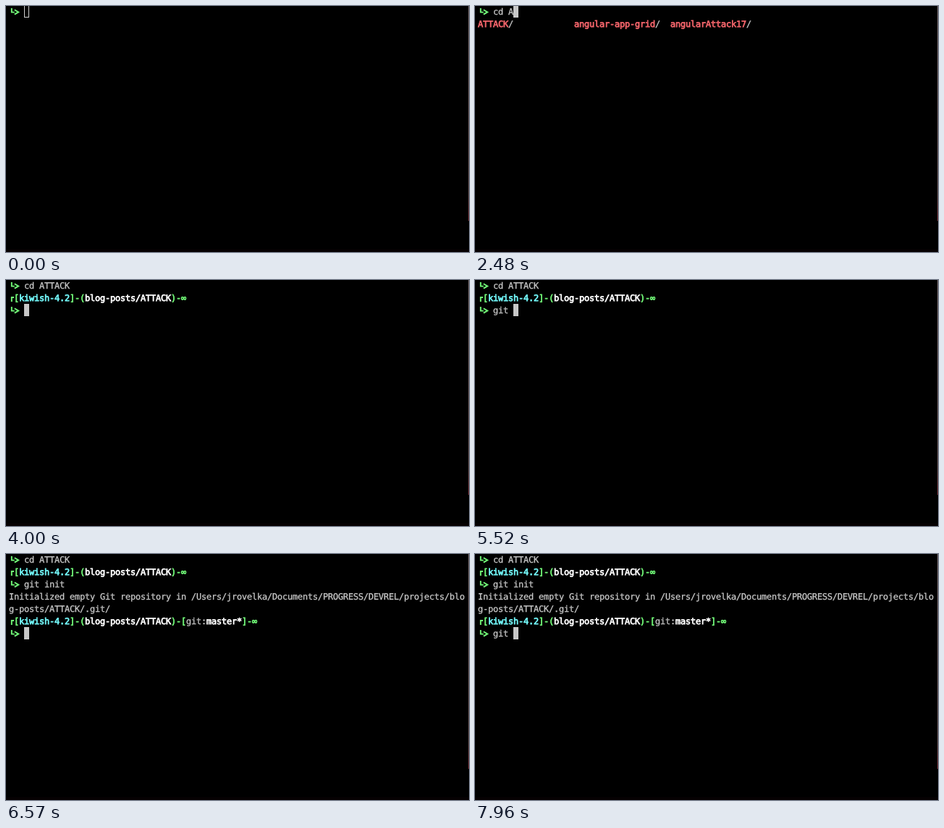
These frames come from a looping animation (640 px wide and 340 px high, 8 s). An HTML page:

```html
<!DOCTYPE html>
<html lang="en">
<head>
<meta charset="utf-8">
<title>Terminal session</title>
<style>
  html, body { margin: 0; width: 100%; height: 100%; overflow: hidden; background: #000; }
  svg { display: block; width: 640px; height: 340px; }
  text {
    font: 12px "DejaVu Sans Mono", "Liberation Mono", monospace;
    letter-spacing: -.224px;
    white-space: pre;
    text-rendering: geometricPrecision;
    fill: currentColor;
    stroke: currentColor;
    stroke-width: .75;
  }
  .plain { color: #c7c7c7; stroke-width: .3; }
  .green { color: #72fa78; }
  .cyan { color: #74fbfd; }
  .white { color: #fff; }
  .red { color: #f2646a; }
  .dark { color: #111; stroke-width: .2; }
  .arm { fill: none; stroke: #72fa78; stroke-width: 1.9; }
</style>
</head>
<body>
<svg id="stage" viewBox="0 0 640 340">
  <defs>
    <linearGradient id="edge" x1="0" y1="0" x2="0" y2="1">
      <stop offset="0" stop-color="#6c6062"/>
      <stop offset=".88" stop-color="#5c4a4c"/>
      <stop offset="1" stop-color="#742c36"/>
    </linearGradient>
  </defs>
  <rect width="640" height="340"/>
  <rect y="336" width="640" height="4" fill="#060102"/>
  <rect x="639" width="1" height="297" fill="url(#edge)"/>
</svg>
<script>
const LOOP = 8000, CELL = 7, ROW = 17, LEFT = 4;
const stage = document.getElementById('stage');
const timed = [];
const colX = col => LEFT + col * CELL;
const rowY = row => row * ROW - 1;

function add(tag, attrs, from = 0, to = LOOP) {
  const el = document.createElementNS('http://www.w3.org/2000/svg', tag);
  for (const name in attrs) el.setAttribute(name, attrs[name]);
  stage.append(el);
  timed.push({ el, from, to });
  return el;
}

// Writes [style, text] runs one after another on a row.
function write(row, col, runs, from, to) {
  for (const [style, text] of runs) {
    add('text', { class: style, x: colX(col), y: row * ROW + 12 }, from, to).textContent = text;
    col += text.length;
  }
}

function arrow(row, from) {
  const y = row * ROW;
  add('path', { class: 'arm', d: `M7.8 ${y + 3}v5.6h4M11.8 ${y + 5.2}l5.4 3.2l-5.4 3.2` }, from);
}

function prompt(row, from, branch) {
  add('path', { class: 'arm', d: `M11 ${row * ROW + 7}h-3.2v6` }, from);
  const git = branch ? [['green', '['], ['plain', 'git:'], ['white', branch], ['green', ']-']] : [];
  write(row, 1, [
    ['green', '['], ['cyan', 'kiwish-4.2'], ['green', ']-('],
    ['white', 'blog-posts/ATTACK'], ['green', ')-'], ...git, ['green', '∞']
  ], from);
  arrow(row + 1, from);
}

// Cursor stops: [time, row, column]
const stops = [[0, 0, 3]];

function type(row, text, times, to) {
  times.forEach((time, i) => {
    write(row, 3 + i, [['plain', text[i]]], time, to);
    stops.push([time, row, 4 + i]);
  });
}

const LIST = 2480, PICK = 2760, ACCEPT = 3130, RUN = 3520, READY = 3680;
const INIT = 6350, DONE = 6480;

arrow(0, 0);
type(0, 'cd A', [1130, 1300, 1570, 1870]);

add('rect', { x: LEFT, y: rowY(1), width: 17 * CELL, height: ROW, fill: '#c7c7c7' }, PICK, ACCEPT);
write(1, 0, [['red', 'ATTACK'], ['plain', '/']], LIST, PICK);
write(1, 0, [['dark', 'ATTACK/']], PICK, ACCEPT);
write(1, 19, [['red', 'angular-app-grid'], ['plain', '/']], LIST, ACCEPT);
write(1, 38, [['red', 'angularAttack17'], ['plain', '/']], LIST, ACCEPT);

write(0, 7, [['plain', 'TTACK']], PICK);
write(0, 12, [['white', '/']], PICK, RUN);
stops.push([PICK, 0, 13], [RUN, 1, 0], [READY, 2, 3]);

prompt(1, READY);
type(2, 'git init', [5220, 5300, 5380, 5480, 5640, 5760, 5880, 5980]);

stops.push([INIT, 3, 0], [DONE, 6, 3]);
write(3, 0, [['plain', 'Initialized empty Git repository in /Users/jrovelka/Documents/PROGRESS/DEVREL/projects/blo']], INIT + 60);
write(4, 0, [['plain', 'g-posts/ATTACK/.git/']], INIT + 60);
prompt(5, DONE, 'master*');
type(6, 'git ', [7700, 7780, 7860, 7950]);

const cursor = add('rect', { width: CELL, height: ROW, fill: '#c7c7c7' }, 300);
add('rect', { x: 25.5, y: -.5, width: 6, height: 16, fill: 'none', stroke: '#d0d0d0' }, 0, 300);

function draw(t) {
  for (const { el, from, to } of timed) {
    el.style.display = t >= from && t < to ? '' : 'none';
  }
  const [, row, col] = stops.filter(stop => stop[0] <= t).pop();
  cursor.setAttribute('x', colX(col));
  cursor.setAttribute('y', rowY(row));
}

const start = performance.now();
function tick() {
  draw((performance.now() - start) % LOOP);
  requestAnimationFrame(tick);
}
tick();
</script>
</body>
</html>
```
